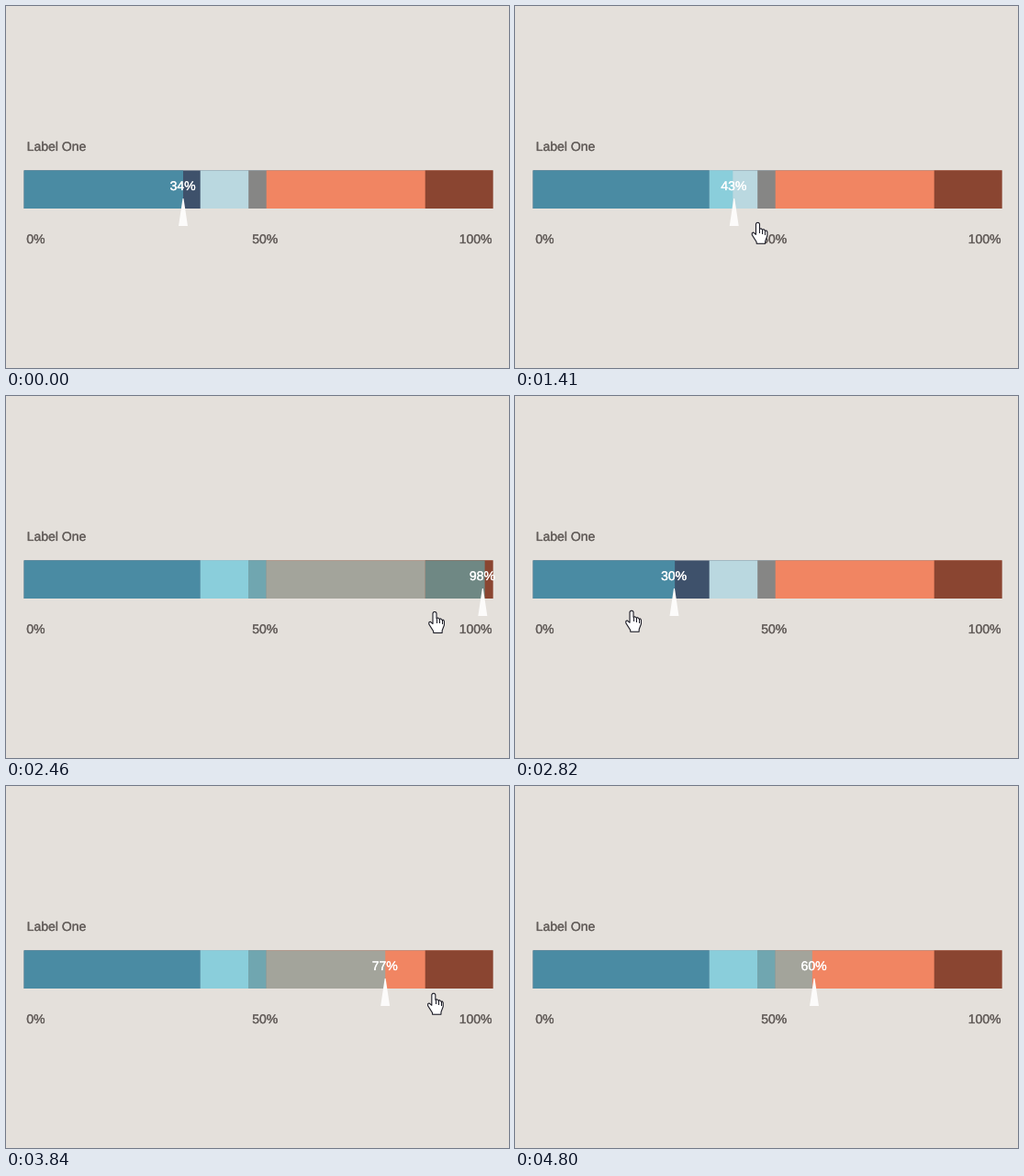
A matplotlib script that plays this animation: 548 by 395 pixels, repeating every 5.55 s.

```python
import numpy as np
import matplotlib.pyplot as plt
from matplotlib.animation import FuncAnimation
from matplotlib.patches import Polygon, Rectangle
from matplotlib.patheffects import withStroke

W, H, DPI = 548, 395, 100
FRAMES, STEP = 185, 30
LEFT, RIGHT, TOP, BOTTOM = 20, 530, 179.4, 221
LAG, ENTER, GRAB, RELEASE, GONE = 60, 60, 1140, 4530, 4800

INK, GREY = "#1c1c26", "#645e5b"
EDGES = [19.6, 211.7, 264.2, 283.7, 456.7, 530.4]
REST = ["#3e516b", "#bad8e0", "#868685", "#f18562", "#8a4531"]
FILLED = ["#4a8ba3", "#8acedb", "#70a6b0", "#a3a49b", "#6f8884"]

# pointer moves: start, end, x, y, pace (below 1 hurries early), bend of y
START = np.array([520.0, 68.0])
MOVES = [
    (ENTER, 870, 193, 236, .45, .5),
    (GRAB, 2085, 536, 235, .98, 1),
    (2370, 3150, 0, 224, .69, 8),
    (3450, 4020, 536, 226, .68, 1),
    (4200, 4470, 326, 227, 1, 1),
    (RELEASE, 4920, 602, 76, 1, 1),
]

HAND = np.array([
    (-2, 2), (-1, .6), (1, .6), (2, 2), (2, 7.6), (3.6, 7), (5, 8.3),
    (6.6, 7.9), (8, 9.4), (9.6, 9.3), (10.4, 10.8), (10.4, 15), (8.2, 20.8),
    (8.1, 23.5), (-1.2, 23.5), (-1.4, 21.6), (-6.2, 14), (-6.2, 12),
    (-4.8, 11.2), (-2, 13.6)]) + (.4, 0)
ARROW = np.array([(.5, .7), (.5, 16.3), (4, 13), (6.4, 18.5), (8.8, 17.5),
                  (6.5, 12), (11.4, 11.7)])
NEEDLE = np.array([(-.5, 210), (.5, 210), (5, 240), (-5, 240)])


def pointer(t):
    pos = START
    for t0, t1, x, y, pace, bend in MOVES:
        if t <= t0:
            break
        u = min((t - t0) / (t1 - t0), 1) ** pace
        s = u * u * (3 - 2 * u)
        pos = pos + (np.array([x, y]) - pos) * (s, s ** bend)
    return pos


def slider_x(t):
    """The slider trails the dragging pointer."""
    x = pointer(np.clip(t - LAG, GRAB, RELEASE))[0]
    return float(np.clip(x, LEFT, RIGHT))


def fill_edge(x):
    """The fill drifts slightly around the needle."""
    return x - 2.3 * np.sin(np.pi * (x - 193) / 217)


plt.rcParams["font.family"] = "Liberation Sans"
plt.rcParams["text.hinting"] = "none"
plt.rcParams["toolbar"] = "None"
fig = plt.figure(figsize=(W / DPI, H / DPI), dpi=DPI, facecolor="#e4e0db")
ax = fig.add_axes([0, 0, 1, 1])
ax.set_xlim(0, W)
ax.set_ylim(H, 0)
ax.axis("off")


def px(size):
    return size * 72 / DPI


def write(x, y, text, color=GREY, ha="left", z=1):
    heavier = [withStroke(linewidth=px(.25), foreground=color)]
    return ax.text(x, y, text, fontsize=px(14), color=color, ha=ha,
                   va="baseline", zorder=z, path_effects=heavier)


def shape(points, fill, line="none", width=0.0, z=4):
    return ax.add_patch(Polygon(points, closed=True, fc=fill, ec=line,
                                lw=px(width), joinstyle="round", zorder=z))


def band(x0, x1, color, z):
    return ax.add_patch(Rectangle((x0, TOP), x1 - x0, BOTTOM - TOP, fc=color,
                                  ec="none", snap=False, zorder=z))


write(22.7, 158, "Label One")
write(22.3, 259, "0%")
write(282.2, 259, "50%", ha="center")
write(529.5, 259, "100%", ha="right")

spans = list(zip(EDGES, EDGES[1:]))
for (a, _), color in zip(spans, REST):
    band(a, EDGES[-1], color, 1)
fills = [band(a, b, color, 2) for (a, b), color in zip(spans, FILLED)]

needle = shape(NEEDLE, "#fcfbfa", z=3)
value = write(0, 201, "", "white", "center", 4)
hand = shape(HAND, "white", INK, 1.1, 5)
knuckles = [ax.plot([], [], color=INK, lw=px(1), zorder=6)[0]
            for _ in range(3)]
arrow = shape(ARROW, "white", INK, 1, 5)


def draw(n):
    t = n * STEP
    x = slider_x(t)
    edge = fill_edge(x)
    for patch, (a, b) in zip(fills, spans):
        patch.set_width(max(0, min(edge, b) - a))
        patch.set_visible(edge > a)
    needle.set_xy(NEEDLE + (x, 0))
    value.set_x(x - .4)
    value.set_text(f"{round((x - LEFT) / (RIGHT - LEFT) * 100)}%")

    tip = pointer(t)
    shown = ENTER <= t < GONE
    grip = 690 <= t <= RELEASE and tip[0] > 12
    hand.set_xy(HAND + tip)
    hand.set_visible(shown and grip)
    for i, line in enumerate(knuckles):
        kx, ky = tip + (2.4 + 2.9 * i, 7.6 + .8 * i)
        line.set_data([kx, kx], [ky, ky + 4])
        line.set_visible(shown and grip)
    arrow.set_xy(ARROW + tip)
    arrow.set_visible(shown and not grip)
    return [*fills, needle, value, hand, *knuckles, arrow]


anim = FuncAnimation(fig, draw, frames=FRAMES, interval=STEP, repeat=True,
                     repeat_delay=0, blit=False)
plt.show()
```
